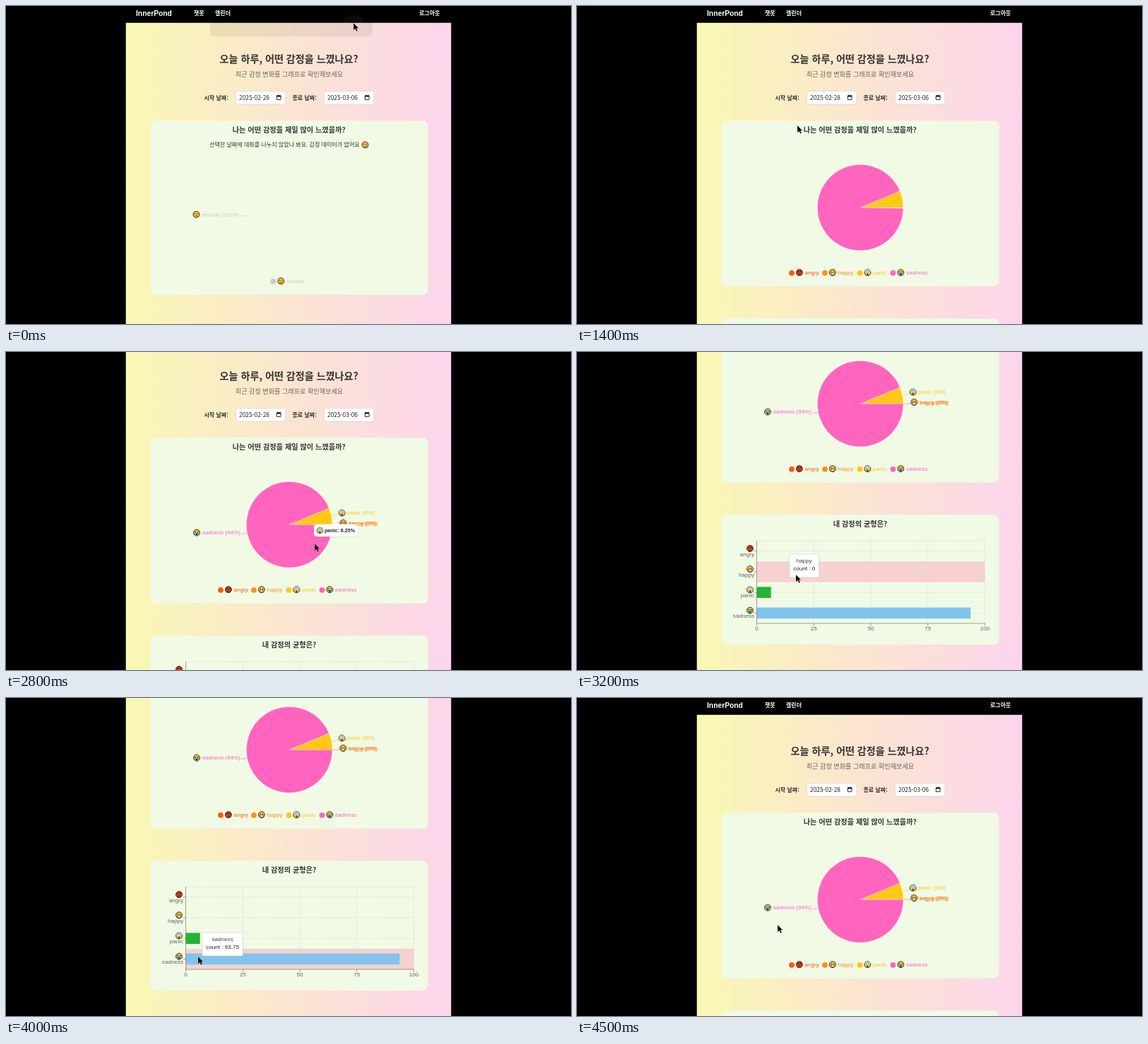
An HTML page that plays this animation: 800x450 px, repeating every 4600 ms.

```html
<!DOCTYPE html>
<html lang="ko">
<head>
<meta charset="utf-8">
<title>감정 그래프</title>
<style>
html, body { margin: 0; width: 100%; height: 100%; overflow: hidden; background: #000; }
svg { display: block; width: 800px; height: 450px; }
text { font-family: "Noto Sans CJK KR", "Noto Sans CJK", "Noto Sans", sans-serif; white-space: pre; }
text.latin { font-family: "Liberation Sans", Arial, sans-serif; }
</style>
</head>
<body>
<svg id="stage" viewBox="0 0 800 450" lang="ko"></svg>
<script>
const LOOP = 4600, STEP = 100;
const PIE = { x: 401.2, y: 285.3, r: 60.8 };
const PLOT = { x: 254.5, y: 267.2, w: 323, row: 29.2 };
const CHART_TOP = 212;
const MOODS = [
  { name: 'angry', share: 0, color: '#ff5a0a', legend: 304 },
  { name: 'happy', share: 0, color: '#ff8c1f', legend: 351 },
  { name: 'panic', share: 6.25, color: '#ffc815', legend: 400.5, bar: '#25b432' },
  { name: 'sadness', share: 93.75, color: '#ff64be', legend: 447.5, bar: '#80c4ec' }
];

// Tables of [time, values...]
const SCROLL = [[2700, 0], [2800, 41], [2900, 150], [3000, 212], [4200, 212], [4300, 150], [4400, 41], [4500, 0]];
const CURSOR = [
  [0, 492, 24], [300, 480, 40], [1100, 318, 165], [1400, 312, 169], [1950, 385, 248], [2050, 385, 248],
  [2300, 441, 276], [2500, 437, 271], [3000, 437, 271], [3100, 295, 287], [3200, 310, 315],
  [3400, 306, 318], [3600, 290, 342], [3800, 272, 367], [4000, 272, 366], [4300, 284, 321], [4500, 284, 321]
];
const BAR_TIP = [
  [3100, 301, 286], [3200, 301, 286], [3400, 314, 315], [3600, 298, 344],
  [3800, 280, 333], [4000, 278, 332], [4100, 279, 332], [4300, 289, 318]
];
const PIE_TIP = [[1800, 377, 297], [2300, 377, 297], [2400, 424, 287], [2500, 436, 284.8]];
const DATA_AT = 500, SWEEP_AT = 700, SWEEP = 750, LABELS_AT = 1500;

function at(table, t) {
  let a = table[0];
  for (const b of table) {
    if (t < b[0]) {
      const p = Math.max(0, (t - a[0]) / (b[0] - a[0] || 1));
      return a.slice(1).map((v, i) => v + (b[i + 1] - v) * p);
    }
    a = b;
  }
  return a.slice(1);
}

// cubic-bezier(.25, .1, .25, 1)
function ease(p) {
  if (p <= 0 || p >= 1) return Math.min(1, Math.max(0, p));
  const curve = (a, b, u) => 3 * a * u * (1 - u) ** 2 + 3 * b * u * u * (1 - u) + u ** 3;
  let lo = 0, hi = 1;
  for (let i = 0; i < 20; i++) {
    const mid = (lo + hi) / 2;
    if (curve(.25, .25, mid) < p) lo = mid; else hi = mid;
  }
  return curve(.1, 1, lo);
}

// Text placed by its vertical middle
function text(x, mid, str, size, fill = '#333', { bold, anchor = 'start', latin } = {}) {
  return `<text x="${x}" y="${mid + size * (latin ? .34 : .37)}" font-size="${size}" fill="${fill}"` +
    ` text-anchor="${anchor}"${bold ? ' font-weight="700"' : ''}${latin ? ' class="latin"' : ''}>${str}</text>`;
}
const latin = (x, mid, str, fill, opt = {}) => text(x, mid, str, opt.size || 8.1, fill, { latin: true, ...opt });
const rect = (x, y, w, h, fill, more = '') => `<rect x="${x}" y="${y}" width="${w}" height="${h}" fill="${fill}" ${more}/>`;
const line = (x1, y1, x2, y2, stroke, more = '') =>
  `<path d="M${x1} ${y1}L${x2} ${y2}" stroke="${stroke}" stroke-width=".6" fill="none" ${more}/>`;
const dot = (x, y, r, fill) => `<circle cx="${x}" cy="${y}" r="${r}" fill="${fill}"/>`;

const INK = '#2b2418';
const stroke = (d, color = INK, w = .8) => `<path d="${d}" fill="none" stroke="${color}" stroke-width="${w}" stroke-linecap="round"/>`;
const eyes = dot(-1.7, -1, .75, INK) + dot(1.7, -1, .75, INK);
const FEATURES = {
  angry: eyes + stroke('M-2.9 -2.5L-.8 -1.5M2.9 -2.5L.8 -1.5M-1.7 2.5Q0 .9 1.7 2.5'),
  happy: eyes + `<path d="M-2.8 .7H2.8Q2.2 3.5 0 3.5T-2.8 .7Z" fill="#fff" stroke="${INK}" stroke-width=".6"/>`,
  panic: `<path d="M-4.4 -.8A4.5 4.5 0 0 1 4.4 -.8Q0 -3 -4.4 -.8Z" fill="#8dc8ec"/>` +
    dot(-1.8, -.5, 1.3, '#fff') + dot(1.8, -.5, 1.3, '#fff') + dot(-1.8, -.5, .6, INK) + dot(1.8, -.5, .6, INK) +
    `<ellipse cy="2.5" rx="1" ry="1.4" fill="${INK}"/>`,
  sadness: stroke('M-2.9 -1.2H-1M2.9 -1.2H1') +
    `<path d="M-3 -.6H-1.3V4H-3ZM3 -.6H1.3V4H3Z" fill="#3fa9ea"/><ellipse cy="2" rx="1.2" ry="1.5" fill="${INK}"/>`,
  neutral: eyes + stroke('M-1.8 2.3Q0 1.2 1.8 2.3'),
  sorry: eyes + stroke('M-1.5 2.5Q0 1.2 1.5 2.5') + `<path d="M2.6 0Q5 3 3.6 4.4T1.8 3Z" fill="#3fa9ea"/>`
};
function face(name, x, y, r = 4.7) {
  return `<g transform="translate(${x} ${y}) scale(${r / 4.7})"><circle r="4.5" fill="${name === 'angry' ? '#dc3d14' : '#fcc138'}"` +
    ` stroke="${INK}" stroke-width=".9"/>${FEATURES[name]}</g>`;
}

const pen = document.createElement('canvas').getContext('2d');
function widthOf(str, font) {
  pen.font = font + ' "Liberation Sans", Arial, sans-serif';
  return pen.measureText(str).width;
}

function dateField(x, label, value) {
  const icon = x + 58.3;
  return text(x - 44.5, 130, label, 8, '#333', { bold: true }) +
    rect(x + .3, 120.5, 70.6, 18.6, '#fff', 'rx="2.5" stroke="#ccc" stroke-width=".6"') +
    text(x + 5, 130, value, 8.4, '#222') +
    rect(icon, 127, 5.8, 5.6, 'none', 'rx=".5" stroke="#111" stroke-width=".9"') + rect(icon, 126.6, 5.8, 1.9, '#111') +
    rect(icon + .7, 125.8, .9, 1.2, '#111') + rect(icon + 4.2, 125.8, .9, 1.2, '#111');
}

function header() {
  return rect(169, 0, 462, 23.8, '#000') +
    latin(184, 10, 'InnerPond', '#fff', { size: 10.3, bold: true }) +
    [[266, '챗봇'], [296, '캘린더'], [585, '로그아웃']].map(([x, s]) => text(x, 10.5, s, 8, '#fff', { bold: true })).join('');
}

const mid = { anchor: 'middle' }, midBold = { anchor: 'middle', bold: true };
const intro = text(400.7, 75, '오늘 하루, 어떤 감정을 느꼈나요?', 14.1, '#333', midBold) +
  text(401, 97, '최근 감정 변화를 그래프로 확인해보세요', 9.1, '#6a6660', mid) +
  dateField(325, '시작 날짜:', '2025-02-28') + dateField(450, '종료 날짜:', '2025-03-06');

const card = (y, h) => rect(204.4, y, 393.4, h, '#f0fae5', 'rx="8"');

const emptyCard = text(288, 196, '선택한 날짜에 대화를 나누지 않았나 봐요. 감정 데이터가 없어요', 8.05) +
  face('sorry', 508.5, 196.5) + face('neutral', 269.5, 295) +
  latin(277, 295, 'neutral (100%)', '#ccc') + line(331, 297, 341, 297, '#ccc') +
  dot(378.3, 389.8, 4, '#ccc') + face('neutral', 389.3, 389.2) + latin(397, 389, 'neutral', '#ccc');

const legend = MOODS.map(m => dot(m.legend, 377.8, 3.9, m.color) + face(m.name, m.legend + 10.9, 377.2) +
  latin(m.legend + 18.6, 377, m.name, m.color)).join('');

const [angry, happy, panic, sadness] = MOODS.map(m => m.color);
const pieLabels = face('sadness', 270, 296.7) + latin(278, 296.5, 'sadness (94%)', sadness) + line(333, 299, 341.5, 297, sadness) +
  face('panic', 475.7, 268.7) + latin(483.3, 268.5, 'panic (6%)', panic) + line(460.5, 273.3, 470, 271, panic) +
  line(461.5, 285.3, 472, 285.3, happy) + face('happy', 477.3, 283) +
  latin(485, 283, 'angry (0%)', angry) + latin(485, 283, 'happy (0%)', happy);

function pie(open) {
  let from = 0, out = '';
  const point = a => `${PIE.x + PIE.r * Math.cos(a)} ${PIE.y - PIE.r * Math.sin(a)}`;
  for (const m of MOODS) {
    const to = from + m.share / 100 * 2 * Math.PI * open;
    out += `<path d="M${PIE.x} ${PIE.y}L${point(from)}A${PIE.r} ${PIE.r} 0 ${to - from > Math.PI ? 1 : 0} 0 ${point(to)}Z"` +
      ` fill="${m.color}" stroke="#fff" stroke-width=".5" stroke-opacity=".7"/>`;
    from = to;
  }
  return out;
}

function barChart(row) {
  const { x, y, w, row: h } = PLOT, right = x + w, bottom = y + 4 * h;
  const dash = 'stroke-dasharray="1.8 1.8"';
  let out = card(230.3, 183.6) + text(401, 243, '내 감정의 균형은?', 10.2, '#333', midBold);
  for (let i = 1; i <= 4; i++) out += line(x + w * i / 4, y, x + w * i / 4, bottom, '#ccc', dash);
  out += line(x, y, right, y, '#ccc', dash);
  MOODS.forEach((m, i) => out += line(x, y + h * (i + .5), right, y + h * (i + .5), '#ccc', dash));
  if (row >= 0) out += rect(x, y + h * row, w, h, '#f5d1d0');
  MOODS.forEach((m, i) => {
    const c = y + h * (i + .5);
    if (m.share) out += rect(x, c - 7.8, w * m.share / 100, 15.6, m.bar);
    out += line(x - 3.5, c, x, c, '#666') + face(m.name, 245, c - 3.7) +
      latin(251, c + 4.3, m.name, '#666', { anchor: 'end' });
  });
  out += line(x, y, x, bottom, '#666') + line(x, bottom, right, bottom, '#666');
  for (let i = 0; i <= 4; i++) {
    const tx = x + w * i / 4;
    out += line(tx, bottom, tx, bottom + 3.5, '#666') + latin(tx, 390.8, i * 25, '#666', mid);
  }
  return out;
}

function barTip(t, row) {
  const [x, y] = at(BAR_TIP, t), m = MOODS[row], count = `count : ${m.share}`;
  const w = widthOf(count, '8.1px') + 10.5;
  return rect(x, y, w, 33, '#fff', 'stroke="#ccc" stroke-width=".6"') +
    latin(x + w / 2, y + 9.7, m.name, '#444', mid) + latin(x + w / 2, y + 20.7, count, '#222', mid);
}

function pieTip(t) {
  const [x, y] = at(PIE_TIP, t), m = MOODS[t < 2300 ? 3 : 2], label = `${m.name}: ${m.share}%`;
  const w = widthOf(label, '700 7.1px') + 19;
  return rect(x - .4, y + .6, w + .8, 17.6, '#000', 'rx="4" opacity=".1"') + rect(x, y, w, 17.4, '#fff', 'rx="4"') +
    face(m.name, x + 8.4, y + 8.8, 4.3) + latin(x + 15, y + 8.8, label, '#222', { size: 7.1, bold: true });
}

const dialog = rect(289, 0, 230, 43, '#000', 'rx="6" opacity=".065"');
const button = '<ellipse cx="492" cy="23" rx="15" ry="10" fill="#ffc8be" opacity=".06"/>';

function page(t, row) {
  const ready = t >= DATA_AT;
  let out = (t < STEP ? dialog : '') + header() + (t < STEP ? button : '') + intro + card(162.3, ready ? 234.5 : 246.5) +
    text(400.8, 175, '나는 어떤 감정을 제일 많이 느꼈을까?', 10.2, '#333', midBold);
  if (!ready) return out + emptyCard;
  if (t > SWEEP_AT) out += pie(ease((t - SWEEP_AT) / SWEEP));
  if (t >= LABELS_AT) out += pieLabels;
  out += legend + `<g transform="translate(0 ${CHART_TOP})">${barChart(row)}${row >= 0 ? barTip(t, row) : ''}</g>`;
  return out + (t >= 1800 && t < 3000 ? pieTip(t) : '');
}

const stage = document.getElementById('stage');
const backdrop = fill => rect(169.7, 0, 460.6, 450, fill);
stage.innerHTML = `<defs><linearGradient id="sky"><stop stop-color="#f9f8b4"/><stop offset=".5" stop-color="#fbe5d0"/>
  <stop offset="1" stop-color="#fcd5ec"/></linearGradient></defs>
  ${rect(0, 0, 800, 450, '#000')}${backdrop('url(#sky)')}<g id="page"></g>
  <path id="cursor" d="M0 0V10.2L2.4 8L4.2 11.8L5.9 11L4.2 7.4H7.3Z" fill="#000" stroke="#fff" stroke-opacity=".45" stroke-width=".5"/>`;
const pageLayer = document.getElementById('page'), cursor = document.getElementById('cursor');

function draw(t) {
  const [x, y] = at(CURSOR, t);
  const overBars = t >= 3100 && t < 4500;
  const row = overBars ? Math.min(3, Math.max(0, Math.floor((y - PLOT.y) / PLOT.row))) : -1;
  pageLayer.innerHTML = page(t, row);
  pageLayer.setAttribute('transform', `translate(0 ${-at(SCROLL, t)[0]})`);
  cursor.setAttribute('transform', `translate(${x} ${y})`);
}

const start = performance.now();
let shown = -1;
function tick() {
  const t = Math.floor((performance.now() - start) % LOOP / STEP) * STEP;
  if (t !== shown) draw(shown = t);
  requestAnimationFrame(tick);
}
tick();
</script>
</body>
</html>
```
